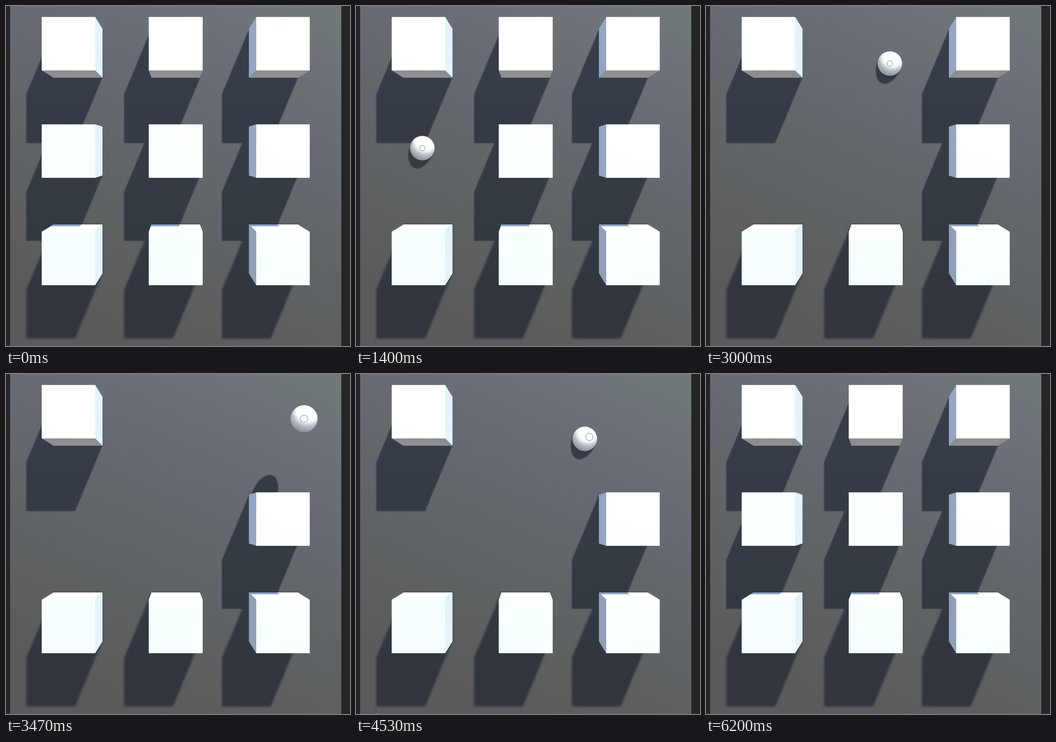
An HTML page with a canvas for the animation above (6940 ms loop, 752x744 px).

```html
<!DOCTYPE html>
<html lang="en">
<head>
<meta charset="utf-8">
<title>Ball and cubes</title>
<style>
  html, body { margin: 0; width: 100%; height: 100%; overflow: hidden; background: #252525; }
  canvas { display: block; }
</style>
</head>
<body>
<canvas id="stage" width="752" height="744"></canvas>
<script>
const ctx = document.getElementById('stage').getContext('2d');
const LOOP = 6940, TICK = 1000 / 15;
const SPAWN = 60, RESET = 5720;
const MID = { x: 371, y: 317.5 };      // point below the camera
const CAMERA = 11.2;                   // camera height in cube edges
const GAP = 213.8, HALF = 53.4, RADIUS = 26.8;
const SUN = { x: -59.5, y: 143 };      // shadow shift per unit of height
const SLOPE = Math.hypot(SUN.x, SUN.y);
const CHARGE = 280, RING = 8;          // the ring grows before each move

const leg = (start, end, x, y, h = 0) => ({ start, end, x, y, h });

const moves = [
  leg(0, 0, 208, 424),
  leg(270, 600, 128, 320, 1.05),       // hop onto the left cube and drop
  leg(795, 1000, 145, 311),
  leg(1470, 2000, 345, 311),           // roll through the centre cube
  leg(2000, 2400, 414, 178),
  leg(2400, 2670, 405, 132, 1.05),     // hop onto the top cube and drop
  leg(2730, 2930, 402, 126),
  leg(3070, 3467, 626, 118, 1.03),     // leap to the corner and drop
  leg(3467, 3600, 653, 78),
  leg(4000, 4534, 500, 142),           // roll back and into the right cube
  leg(4534, 5200, 625, 268),
  leg(5470, 5700, 705, 268)
];

const pointerMoves = [leg(0, 0, 45, 744), leg(4390, 5330, 43, 725), leg(5900, 6190, 38, 744)];

// removal times by "column,row"; the others stay
const removal = { '-1,0': 795, '0,0': 1795, '0,-1': 2730, '1,-1': 3460, '1,0': 4995 };

const cubes = [];
for (const row of [-1, 0, 1]) {
  for (const col of [-1, 0, 1]) {
    cubes.push({ col, row, x: MID.x + col * GAP, y: MID.y + row * GAP, gone: removal[[col, row]] || RESET });
  }
}

const clamp = v => Math.min(1, Math.max(0, v));
const mix = (a, b, p) => a + (b - a) * p;
const easeOut = p => p * (2 - p);
const easeIn = p => p * p;

function current(legs, t) {
  let i = 1;
  while (i + 1 < legs.length && legs[i + 1].start < t) i++;
  const from = legs[i - 1], to = legs[i];
  return { from, to, next: legs[i + 1], p: clamp((t - to.start) / (to.end - to.start)) };
}

function ballAt(t) {
  const { from, to, next, p } = current(moves, t);
  const ball = { x: mix(from.x, to.x, p), y: mix(from.y, to.y, p), ring: RING, ox: 0, oy: 0 };
  ball.h = mix(from.h, to.h, to.h > from.h ? easeOut(p) : easeIn(p));

  const waiting = t <= to.start ? to : t > to.end ? next : null;
  if (waiting) {
    ball.ring = RING * clamp(1 - (waiting.start - t) / CHARGE);
  } else if (!from.h && !to.h) {
    // while rolling, the ring slides back over the ball
    const dx = to.x - from.x, dy = to.y - from.y, shift = -11 * p / Math.hypot(dx, dy);
    ball.ox = dx * shift;
    ball.oy = dy * shift;
  }
  return ball;
}

function project(x, y, h) {
  const k = CAMERA / (CAMERA - h);
  return [MID.x + (x - MID.x) * k, MID.y + (y - MID.y) * k, k];
}

const snap = (x, y, h) => project(x, y, h).slice(0, 2).map(Math.round);

function blend(gradient, ...stops) {
  stops.forEach(([at, color]) => gradient.addColorStop(at, color));
  return gradient;
}

const floorFill = blend(ctx.createLinearGradient(660, 0, 330, 744),
  [0, '#71787b'], [.16, '#6c7278'], [.36, '#666a72'], [.6, '#616568'], [.82, '#5d5f60'], [1, '#5a5a5b']);
const shadeFill = blend(ctx.createLinearGradient(0, 150, 0, 730),
  [0, '#363c48'], [.45, '#343b43'], [1, '#31353d']);
const topFill = blend(ctx.createLinearGradient(480, 200, 300, 620), [0, '#fff'], [1, '#f5ffff']);

function trace(points) {
  points.forEach(([x, y], i) => i ? ctx.lineTo(x, y) : ctx.moveTo(x, y));
  ctx.closePath();
}

function polygon(points, fill) {
  ctx.beginPath();
  trace(points);
  ctx.fillStyle = fill;
  ctx.fill();
}

function disc(x, y, r, fill) {
  ctx.beginPath();
  ctx.arc(x, y, r, 0, 7);
  ctx.fillStyle = fill;
  ctx.fill();
}

function outline(color) {
  ctx.strokeStyle = color;
  ctx.lineWidth = 1;
  ctx.stroke();
}

function cubeShadows(list, blur) {
  ctx.filter = `blur(${blur}px)`;
  ctx.fillStyle = shadeFill;
  ctx.beginPath();
  for (const { x, y } of list) {
    const l = x - HALF, r = x + HALF, t = y - HALF, b = y + HALF;
    trace([[l, t], [l + SUN.x, t + SUN.y], [l + SUN.x, b + SUN.y], [r + SUN.x, b + SUN.y], [r, b], [r, t]]);
  }
  ctx.fill();
  ctx.filter = 'none';
}

function drawCube({ col, row, x, y }, shaded) {
  const corner = (sx, sy, h) => snap(x + sx * HALF, y + sy * HALF, h);
  const side = (a, b, fill) => polygon([corner(...a, 0), corner(...b, 0), corner(...b, 1), corner(...a, 1)], fill);
  if (row < 0) side([-1, 1], [1, 1], '#8d8e90');
  if (row > 0) {
    side([-1, -1], [1, -1], '#fff');
    if (shaded) polygon([corner(-1, -1, 0), corner(.15, -1, 0), corner(.15, -1, .25), corner(-1, -1, .25)], '#8ba4ce');
  }
  if (col < 0) side([1, -1], [1, 1], '#e3f3ff');
  if (col > 0) side([-1, -1], [-1, 1], row > 0 ? '#919fb6' : '#93a5c0');
  polygon([corner(-1, -1, 1), corner(1, -1, 1), corner(1, 1, 1), corner(-1, 1, 1)], topFill);
}

// Only the part of the shadow lying away from the sun reaches the floor.
function ballShadow({ x, y, h }) {
  ctx.save();
  ctx.translate(x, y);
  ctx.rotate(Math.atan2(SUN.y, SUN.x));
  ctx.beginPath();
  ctx.rect(0, -80, 600, 160);
  ctx.clip();
  ctx.filter = 'blur(1px)';
  ctx.beginPath();
  ctx.ellipse(SLOPE * h, 0, RADIUS * 1.75, RADIUS, 0, 0, 7);
  ctx.fillStyle = '#353b44';
  ctx.fill();
  ctx.restore();
}

// The light centre lies towards the sun, so the dark side curves like a terminator.
function drawBall(ball) {
  const [x, y, k] = project(ball.x, ball.y, ball.h), r = RADIUS * k;
  const cx = x - SUN.x / SLOPE * r * .66, cy = y - SUN.y / SLOPE * r * .66;
  disc(x, y, r, blend(ctx.createRadialGradient(cx, cy, r * .6, cx, cy, r * 1.6),
    [0, '#fff'], [.25, '#f7f9fb'], [.6, '#b4bbc3'], [1, '#8e959e']));
  if (ball.ring < .5) return;
  disc(x + ball.ox, y + ball.oy, ball.ring, '#fcfdfd');
  outline('#757b82');
}

function drawPointer(t) {
  const { from, to, p } = current(pointerMoves, t);
  ctx.save();
  ctx.translate(mix(from.x, to.x, easeOut(p)), mix(from.y, to.y, easeOut(p)));
  polygon([[0, 0], [0, 15], [3.5, 12], [6, 18], [8, 17], [5.8, 11.3], [10, 10.8]], '#a9a9a9');
  outline('#1f1f1f');
  ctx.restore();
}

function draw(now) {
  const t = Math.floor((now % LOOP + 5) / TICK) * TICK;
  const standing = cubes.filter(c => t < c.gone || t >= RESET);
  const ball = t >= SPAWN && t < RESET ? ballAt(t) : null;
  const above = ball && ball.h > .5;

  ctx.fillStyle = '#252525';
  ctx.fillRect(0, 0, 752, 744);
  ctx.fillStyle = floorFill;
  ctx.fillRect(9, 0, 724, 744);

  ctx.save();
  ctx.beginPath();
  ctx.rect(9, 0, 724, 744);
  ctx.clip();
  cubeShadows(standing.filter(c => c.row < 1), 1);
  cubeShadows(standing.filter(c => c.row > 0), 2);
  if (ball) ballShadow(ball);
  ctx.restore();

  if (ball && !above) drawBall(ball);
  for (const c of standing) {
    drawCube(c, standing.some(o => o.col === c.col && o.row === c.row - 1));
  }
  if (above) drawBall(ball);
  if (t >= 4390 && t < 6190) drawPointer(t);
}

function loop() {
  draw(performance.now());
  requestAnimationFrame(loop);
}
loop();
</script>
</body>
</html>
```
